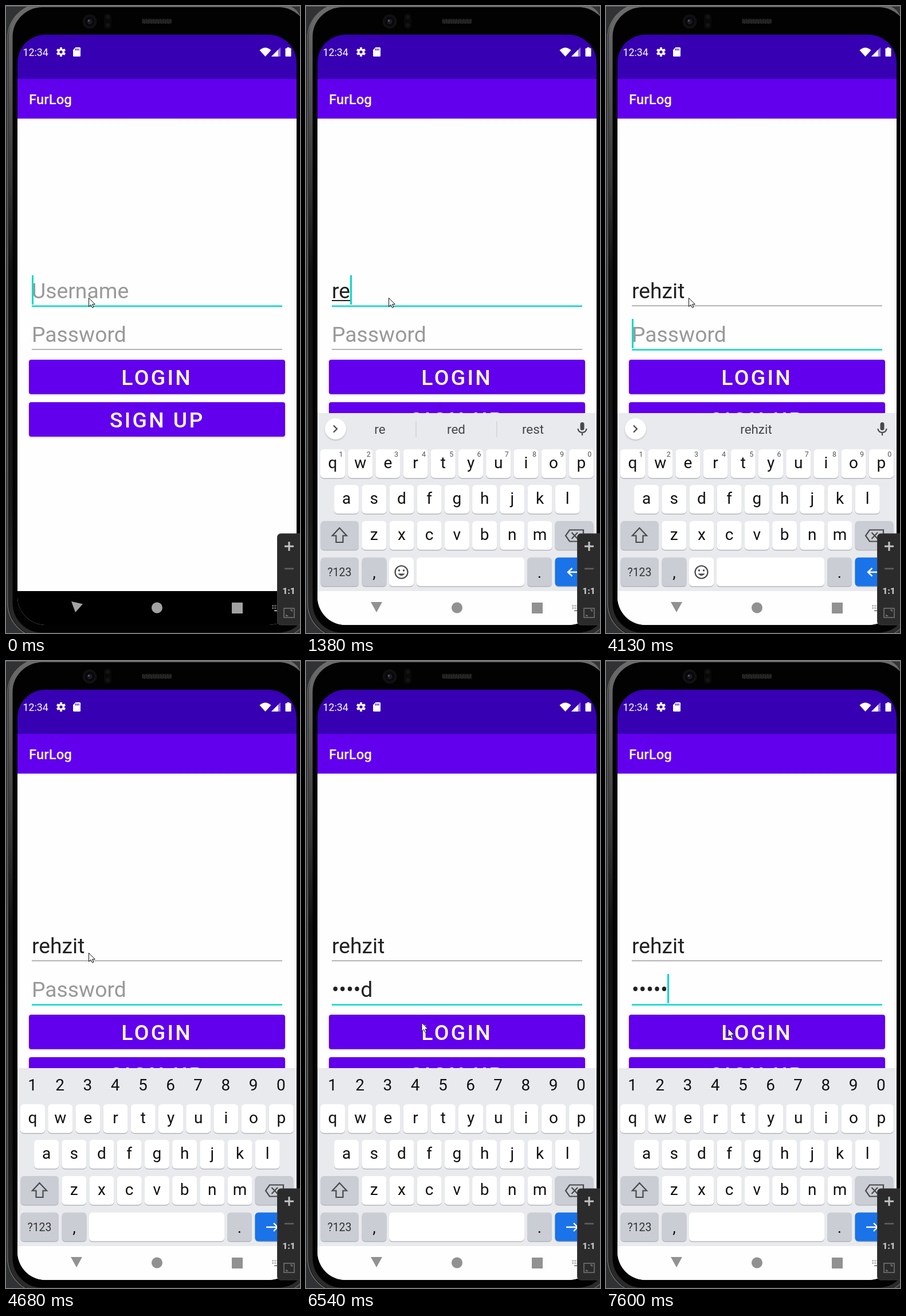
An HTML page for the animation above (8 s loop, 513x1092 px).

```html
<!DOCTYPE html>
<html lang="en">
<head>
<meta charset="utf-8">
<title>Login screen</title>
<style>
html, body { margin: 0; width: 100%; height: 100%; overflow: hidden; background: #2c2e30; }
svg { display: block; width: 513px; height: 1092px; font-family: Roboto, "Noto Sans", sans-serif; }
text { white-space: pre; }
.big { font-size: 37.3px; }
.label { font-weight: 500; fill: #fff; letter-spacing: .0893em; }
.hint { fill: #999; }
.ink { fill: #212121; }
.key { font-size: 28px; text-anchor: middle; fill: #111; }
.sup { font-size: 12.5px; text-anchor: middle; fill: #555; }
.word { font-size: 22.4px; text-anchor: middle; fill: #454649; }
.line { fill: none; stroke: #48494c; stroke-width: 2.2; }
</style>
</head>
<body>
<svg id="stage" viewBox="0 0 513 1092"></svg>
<script>
const rect = (x, y, w, h, fill, r = 0, more = '') =>
  `<rect x="${x}" y="${y}" width="${w}" height="${h}" rx="${r}" fill="${fill}" ${more}/>`;
const circle = (x, y, r, fill, more = '') => `<circle cx="${x}" cy="${y}" r="${r}" fill="${fill}" ${more}/>`;
const text = (x, y, s, cls, more = '') => `<text x="${x}" y="${y}" class="${cls}" ${more}>${s}</text>`;
const path = (d, more) => `<path d="${d}" ${more}/>`;
const group = (id, body, more = '') => `<g id="${id}" ${more}>${body}</g>`;
const range = (n, fn) => Array.from({ length: n }, (_, i) => fn(i)).join('');

const PITCH = 48.2, GREY = '#cacdd4', TEAL = '#03dac5', VIOLET = '#6200ee';

const shadow = (id, dy, blur, opacity) =>
  `<filter id="${id}" x="-5%" y="-20%" width="110%" height="160%" color-interpolation-filters="sRGB">
    <feDropShadow dx="0" dy="${dy}" stdDeviation="${blur}" flood-opacity="${opacity}"/></filter>`;

const defs = `<defs>
  <clipPath id="screen"><rect x="20" y="50" width="487" height="1028" rx="49"/></clipPath>
  <clipPath id="loginBox"><rect x="40" y="616" width="447" height="60" rx="4"/></clipPath>
  ${shadow('low', 1.5, .8, .2)}${shadow('high', 4, 2.4, .28)}
  <linearGradient id="rim" x1="0" y1="0" x2="0" y2="1092" gradientUnits="userSpaceOnUse">
    <stop offset="0" stop-color="#6c6c6c"/><stop offset=".1" stop-color="#5c5c5c"/>
    <stop offset=".28" stop-color="#343434"/><stop offset=".42" stop-color="#0e0e0e"/>
    <stop offset=".8" stop-color="#181818"/><stop offset="1" stop-color="#2c2c2c"/></linearGradient>
  <linearGradient id="fall" x1="0" y1="0" x2="0" y2="1">
    <stop offset="0" stop-color="#000" stop-opacity=".13"/><stop offset="1" stop-color="#000" stop-opacity="0"/></linearGradient>
</defs>`;

const body = () =>
  rect(0, 0, 513, 1092, '#303234') +
  rect(3, -4, 530, 1104, '#090909', 60, 'stroke="#707070" stroke-width="1.4"') +
  rect(8, -1, 522, 1096, '#050505', 55, 'stroke="url(#rim)" stroke-width="7"') +
  rect(12.5, 2, 515, 1088, '#020202', 52) +
  path('M495 0Q507 4 513 17V0Z', 'fill="#333"') +
  rect(0, 0, 513, 1, '#666') +
  circle(146, 27, 12.5, '#101010') + circle(146, 27, 8, '#08080b') + circle(146, 27, 4.5, '#1b1d26') + circle(144.5, 25.5, 1.5, '#5c6069') +
  rect(171, 13, 13, 27, '#090909', 5) + circle(177.5, 19, 3.6, '#141414') + circle(177.5, 33, 3.6, '#141414') +
  rect(237, 22, 53, 9, '#121212', 3) +
  range(17, i => rect(238.5 + i * 3, 23 + i % 2, 1.4, 7, '#363636'));

const cog = range(6, i => rect(94, 72, 4, 16, '#fff', 1, `transform="rotate(${i * 60} 96 80)"`)) +
  circle(96, 80, 5.8, '#fff') + circle(96, 80, 2.6, '#3700b3');

const statusBar = () =>
  rect(20, 50, 487, 77, '#3700b3') +
  text(29.5, 87, '12:34', '', 'font-size="17.8" fill="#fff"') + cog +
  path('M121.5 72H128.500Q130 72 130 73.500V86.500Q130 88 128.500 88H118.500Q117 88 117 86.500V76.500Z', 'fill="#fff"') +
  range(3, i => rect(121 + i * 2.7, 74, 1.3, 3.5, '#3700b3')) +
  path('M442.500 77Q452.500 68 462.500 77L452.500 88Z', 'fill="#fff"') +
  path('M463 88L479 72V88Z', 'fill="#fff" opacity=".45"') + path('M463 88L475 76V88Z', 'fill="#fff"') +
  rect(490.5, 72, 4, 3, '#fff') + rect(487.5, 73.5, 10, 14.5, '#fff', 1);

const form = () =>
  rect(20, 127, 487, 951, '#fefefe') +
  rect(20, 196, 487, 3, 'url(#fall)') + rect(20, 127, 487, 69, VIOLET) +
  text(40, 171, 'FurLog', '', 'font-size="24" font-weight="500" fill="#fff"') +
  text(45, 509, 'Username', 'big hint', 'id="userHint"') + text(45, 509, '', 'big ink', 'id="user"') +
  text(45, 585, 'Password', 'big hint', 'id="passHint"') + text(45, 585, '', 'big ink', 'id="pass"') +
  rect(45, 512, 0, 2, '#212121', 0, 'id="compose"') +
  rect(45, 521.5, 437, 2.5, TEAL, 0, 'id="userLine"') + rect(45, 597.5, 437, 2.5, TEAL, 0, 'id="passLine"') +
  rect(45, 469, 3, 51, TEAL, 0, 'id="caret"') +
  rect(40, 616, 447, 60, VIOLET, 4, 'id="login"') +
  `<g clip-path="url(#loginBox)">${circle(259, 646, 0, '#fff', 'id="ripple"')}</g>` +
  text(201.3, 660, 'LOGIN', 'big label') +
  rect(40, 690, 447, 60, VIOLET, 4, 'filter="url(#low)"') +
  text(180.9, 734, 'SIGN UP', 'big label');

const key = (x, y, w, fill = '#fff') => rect(x, y + 1.4, w, 50, '#b4b7be', 6) + rect(x, y, w, 50, fill, 6);
const letters = (row, cx, y) => [...row].map((c, i) =>
  key(cx + i * PITCH - 21.5, y, 43) + text(cx + i * PITCH, y + 33, c, 'key')).join('');

const smiley = circle(166.5, 986, 11, 'none', 'class="line"') + circle(162.5, 983, 1.7, '#48494c') + circle(170.5, 983, 1.7, '#48494c') +
  path('M160.500 988.500Q166.500 996 172.500 988.500Z', 'fill="#48494c"');

const tools =
  path('M55 730.500L49 736.500L55 742.500', 'class="line"') +
  circle(113, 734, 6.6, 'none', 'class="line"') + path('M118 739L125.500 746.500', 'class="line" style="stroke-width:2.8"') +
  path('M177 728H193Q194.500 728 194.500 729.500V740L188 746.500H177Q175.500 746.500 175.500 745V729.500Q175.500 728 177 728ZM194 740H188V746', 'class="line"') +
  circle(181.5, 733.5, 1.6, '#48494c') + circle(188.5, 733.5, 1.6, '#48494c') + path('M180 738Q185 743.500 189 738', 'class="line"') +
  text(254, 742.5, 'GIF', '', 'font-size="17" font-weight="800" text-anchor="middle" fill="#48494c" letter-spacing=".6"') +
  rect(316.5, 728.5, 17, 18.5, 'none', 2, 'class="line"') + rect(320, 726, 10, 6, '#48494c', 1.5) +
  range(3, i => rect(320, 734.5 + i * 3.6, i < 2 ? 10 : 7, 1.7, '#48494c')) +
  rect(368, 723, 1, 28, '#cfd1d5') + range(3, i => circle(404 + i * 8, 737, 2.3, '#48494c'));

const mic = rect(478.5, 725, 7, 14, '#48494c', 3.5) + path('M474.500 736C474.500 745 489.500 745 489.500 736M482 743V748', 'class="line"');

const keyboard = () =>
  rect(20, 709, 487, 310, '#e9eaee') + rect(20, 1019, 487, 60, '#fefefe') +
  letters('qwertyuiop', 46.5, 772) + letters('asdfghjkl', 70.6, 834) + letters('zxcvbnm', 118.8, 897) +
  key(25.5, 897, 66.5, GREY) + path('M58.500 909L46 922.500H52.500V934H64.500V922.500H71Z', 'class="line"') +
  key(434.5, 897, 67, GREY) + path('M460 912.500H484V932.500H460L453 922.500ZM463.500 917L474 928M474 917L463.500 928', 'class="line"') +
  key(25.5, 960.5, 66.5, GREY) + text(58.5, 992.5, '?123', 'key', 'style="font-size:19.5px;fill:#333"') +
  key(97.5, 960.5, 43, GREY) + text(119, 996, ',', 'key') +
  key(386, 960.5, 43, GREY) + text(407.5, 996, '.', 'key') +
  key(434.5, 960.5, 67, '#1a73e8') +
  group('textKeys',
    range(10, i => text(61 + i * PITCH, 785, (i + 1) % 10, 'sup')) +
    key(145, 960.5, 43) + smiley + key(193, 960.5, 188) +
    path('M480 986H457M464.500 979L457 986L464.500 993', 'fill="none" stroke="#fff" stroke-width="2.4"') +
    circle(51.5, 736.5, 18.5, '#fff', 'filter="url(#low)"') +
    group('tools', tools) +
    group('strip', path('M48 730.500L54 736.500L48 742.500', 'class="line"') +
      group('seps', rect(191.5, 723, 1, 28, '#c3c5ca') + rect(332.5, 723, 1, 28, '#c3c5ca')) +
      [129, 262, 396].map((x, i) => text(x, 745, '', 'word', `id="word${i}"`)).join('')) + mic) +
  group('passKeys',
    range(10, i => text(46 + i * PITCH, 748, (i + 1) % 10, 'key')) + key(145, 960.5, 236) +
    path('M454 986H474M467 979L474 986L467 993', 'fill="none" stroke="#fff" stroke-width="2.4"'));

const nav = () =>
  path('', 'id="back"') + circle(263.5, 1048, 9.5, 'inherit') + rect(394, 1039, 19, 19, 'inherit') +
  range(3, i => range(2, j => rect(464.5 + i * 4, 1043.5 + j * 4, 2.2, 2.2, 'inherit'))) + rect(468, 1052, 8, 2.2, 'inherit');

const sidebar = () =>
  rect(473.5, 919, 46, 159, '#2b2b2c', 6, 'stroke="#3a3a3b"') +
  path('M486 941H502M494 933V949', 'stroke="#c4c4c4" stroke-width="3"') +
  path('M486 980H502', 'stroke="#606060" stroke-width="2.6"') +
  text(493.5, 1024, '1:1', '', 'font-size="15.5" font-weight="800" text-anchor="middle" fill="#c4c4c4"') +
  rect(485, 1049, 18, 16, 'none', 0, 'stroke="#6a6a6a" stroke-width="1.8"') +
  path('M489 1060V1062H492M499 1055V1052H496', 'fill="none" stroke="#6a6a6a" stroke-width="1.8"');

const pointer = group('mouse', path('M0 0V15L3.500 11.800L6 17L8.400 16L6.100 11H10.800Z', 'fill="#fff" stroke="#111" stroke-width="1"'));

document.getElementById('stage').innerHTML = defs + body() +
  `<g clip-path="url(#screen)">${form()}${statusBar()}${rect(20, 1019, 487, 59, '#000', 0, 'id="navBlack"')}` +
  `${group('keyboard', keyboard())}${group('nav', nav())}</g>` + sidebar() + pointer;

const el = {};
document.querySelectorAll('#stage [id]').forEach(e => el[e.id] = e);

const DOWN = 'M113 1038H133L123 1056Z';
const start = {
  back: 'M114 1037L134 1041.500L121 1056Z', shade: '#a2a2a2', board: '', user: '', marked: 0, words: null,
  focus: 'user', caret: 1, dots: 0, last: '', mouse: [144.5, 508.5], ripple: 0, glow: 0, press: 0
};

// Each step changes part of the state from its time (ms) on.
const steps = [
  [150, { back: DOWN }],
  [430, { board: 'text', shade: '#9c9c9c' }],
  [580, { caret: 0, shade: '#919191' }],
  [950, { user: 'r', caret: 1 }],
  [1230, { user: 're', marked: 1, words: ['r', 're', 'return'] }],
  [1380, { marked: 2, words: ['re', 'red', 'rest'] }],
  [1880, { caret: 0 }],
  [2430, { user: 'reh', caret: 1, marked: 3 }],
  [2550, { words: ['reh', 'rehab', 're'] }],
  [2700, { user: 'rehzi', marked: 5 }],
  [2850, { user: 'rehzit', words: ['rehzi', 'rehzit', ''] }],
  [3140, { marked: 6, words: ['', 'rehzit', ''] }],
  [3570, { caret: 0 }],
  [4130, { focus: 'pass', caret: 1, marked: 0 }],
  [4250, { board: 'pass' }],
  [4680, { caret: 0 }],
  [4830, { last: 'n', caret: 1 }],
  [5080, { dots: 1, last: 'u' }],
  [5380, { dots: 2, last: 'm' }],
  [5530, { dots: 3, last: 'o' }],
  [5650, { dots: 4, last: 'd' }],
  [6150, { caret: 0 }],
  [6300, { mouse: [155, 535] }],
  [6420, { mouse: [188, 600] }],
  [6540, { mouse: [202, 630] }],
  [6690, { mouse: [209, 637], caret: 1 }],
  [6810, { mouse: [213, 640] }],
  [7090, { ripple: 135, glow: .2, press: 1 }],
  [7210, { ripple: 219.5, glow: .24, dots: 5, last: '', caret: 0 }],
  [7330, { ripple: 260 }],
  [7480, { glow: .1, press: 0 }],
  [7600, { glow: 0, caret: 1 }]
];

const show = (e, on) => e.setAttribute('display', on ? 'inline' : 'none');
const set = (e, attrs) => Object.entries(attrs).forEach(([k, v]) => e.setAttribute(k, v));

function paint(s) {
  const secret = '•'.repeat(s.dots) + s.last;
  el.user.textContent = s.user;
  el.pass.textContent = secret;
  show(el.userHint, !s.user);
  show(el.passHint, !secret);
  for (const name of ['user', 'pass']) {
    const on = s.focus === name;
    set(el[name + 'Line'], { fill: on ? TEAL : '#858585', height: on ? 2.5 : 1.2 });
  }
  const field = el[s.focus];
  const width = field.textContent ? field.getComputedTextLength() : 0;
  set(el.caret, { x: Math.floor(45 + width), y: s.focus === 'user' ? 469 : 545 });
  show(el.caret, s.caret);
  set(el.compose, { width: s.marked ? el.user.getSubStringLength(0, s.marked) : 0 });
  set(el.ripple, { r: s.ripple, opacity: s.glow });
  set(el.login, { filter: `url(#${s.press ? 'high' : 'low'})` });
  set(el.back, { d: s.back });
  set(el.nav, { fill: s.shade });
  set(el.mouse, { transform: `translate(${s.mouse})` });
  show(el.navBlack, !s.board);
  show(el.keyboard, s.board);
  show(el.textKeys, s.board === 'text');
  show(el.passKeys, s.board === 'pass');
  show(el.tools, !s.words);
  show(el.strip, s.words);
  if (s.words) {
    s.words.forEach((w, i) => el['word' + i].textContent = w);
    show(el.seps, s.words[0]);
  }
}

const began = performance.now();
let shown = -1;
function tick() {
  const t = (performance.now() - began) % 8000;
  const count = steps.filter(([at]) => at <= t).length;
  if (count !== shown) {
    shown = count;
    paint(Object.assign({}, start, ...steps.slice(0, count).map(([, change]) => change)));
  }
  requestAnimationFrame(tick);
}
tick();
</script>
</body>
</html>
```
